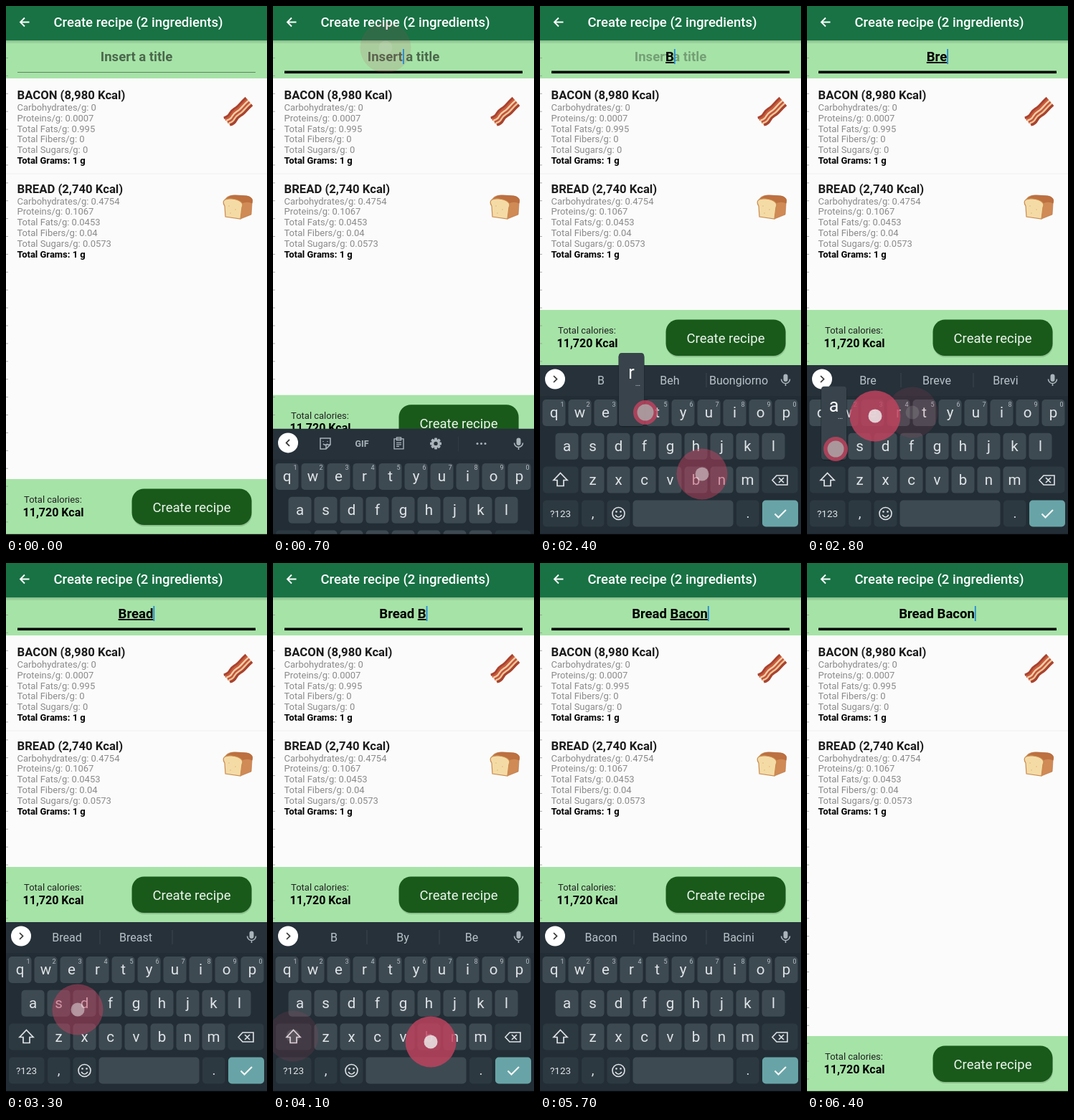
These frames come from a looping animation (364x738 px, 6500 ms). An HTML page:

```html
<!DOCTYPE html>
<html lang="en">
<head>
<meta charset="utf-8">
<style>
html, body { margin: 0; width: 100%; height: 100%; overflow: hidden; background: #fbfbfb; }
svg { display: block; width: 100vw; height: 100vh; font-family: Roboto, sans-serif; }
text { white-space: pre; }
</style>
</head>
<body>
<svg id="stage" viewBox="0 0 364 738"></svg>
<script>
const LOOP = 6500, STEP = 100;
const GREEN = '#a6e3a7', KEY = '#3e4a52', DARK_KEY = '#2d3941', BOARD = '#222d35', INK = '#dfe4e7', PINK = '#c2425e';
const stage = document.getElementById('stage');

const rect = (x, y, w, h, fill, r = 0, extra = '') =>
  `<rect x="${x}" y="${y}" width="${w}" height="${h}" rx="${r}" fill="${fill}" ${extra}/>`;
const text = (x, y, size, fill, str, extra = '') =>
  `<text x="${x}" y="${y}" font-size="${size}" fill="${fill}" ${extra}>${str}</text>`;
const line = (d, color, width = 1.6, fill = 'none') =>
  `<path d="${d}" fill="${fill}" stroke="${color}" stroke-width="${width}"/>`;
const circle = (x, y, r, fill, opacity = 1) =>
  `<circle cx="${x}" cy="${y}" r="${r}" fill="${fill}" opacity="${opacity}"/>`;
const group = (y, content) => `<g transform="translate(0 ${y})">${content}</g>`;
const MID = 'text-anchor="middle"', BOLD = 'font-weight="700"';

const clamp = v => Math.max(0, Math.min(1, v));
const easeOut = (t, from, to) => 1 - (1 - clamp((t - from) / (to - from))) ** 2;

// time, key, finger x, finger y
const touches = [
  [300, 'title', 157, 58], [1700, 'shift', 28, 660], [2100, 'B', 226, 653],
  [2400, 'r', 147, 567], [2600, 'e', 95, 572], [2800, 'a', 40, 618], [3000, 'd', 100, 623],
  [3400, ' ', 190, 708], [3700, 'shift', 28, 660], [3900, 'B', 220, 668], [4200, 'a', 42, 617],
  [4400, 'c', 143, 664], [4600, 'o', 303, 572], [4900, 'n', 252, 665], [5800, 'done', 335, 708]
];
const typed = touches.filter(([, key]) => key.length === 1);
const suggestions = {
  'B': ['B', 'Beh', 'Buongiorno'], 'Br': ['Br', 'Bravo', 'Brava'], 'Bre': ['Bre', 'Breve', 'Brevi'],
  'Brea': ['Brea', 'Bread', 'Break'], 'Bread': ['Bread', 'Breast', ''], 'Bread ': ['e', 'di', 'in'],
  'Bread B': ['B', 'By', 'Be'], 'Bread Ba': ['Ba', 'Bar', 'Basta'], 'Bread Bac': ['Bac', 'Bacio', 'Baci'],
  'Bread Baco': ['Baco', 'Bacon', 'Bacoli'], 'Bread Bacon': ['Bacon', 'Bacino', 'Bacini']
};

function ingredient(top, name, values) {
  const labels = ['Carbohydrates', 'Proteins', 'Total Fats', 'Total Fibers', 'Total Sugars'];
  return group(top,
    text(15.5, 29.4, 16.69, '#1c1c1c', name, BOLD) +
    labels.map((label, i) => text(15.5, 45 + i * 14.83, 12.98, '#8a8a8a', `${label}/g: ${values[i]}`)).join('') +
    text(15.5, 119.2, 12.98, '#000', 'Total Grams: 1 g', BOLD));
}

function bacon() {
  const strips = [[-6.5, '#a8432f'], [-3.5, '#c9593c'], [-1, '#f3cfa4'], [1.5, '#c4553d'], [4, '#f0c698'], [6.5, '#a8432f']];
  return strips.map(([offset, color]) => `<g transform="translate(${offset * .65} ${offset * .75})">` +
    line('M308 161c5-1 7-3 9-7s5-5 9-8 5-6 13-13', color, 3.4) + '</g>').join('');
}

const bread = () =>
  line('M304 274Q306 264 318 264L336 265Q346 267 343 276L342 291L327 297Z', '#b66b3b', .6, '#d08a55') +
  line('M308 269Q312 264 320 264L336 265Q346 267 343 275Q335 271 328 276Q322 268 308 269Z', '#b4683a', .5, '#bd7040') +
  line('M305 279C300 271 306 268 315 269S333 274 329 281L327 297L306 294Z', '#c98a4e', 1.2, '#f4dba6') +
  [[311, 279], [320, 284], [313, 289]].map(([x, y]) => circle(x, y, .8, '#dcb578')).join('');

const page = rect(0, 0, 364, 738, '#fbfbfb') +
  ingredient(101, 'BACON (8,980 Kcal)', [0, '0.0007', '0.995', 0, 0]) + bacon() +
  rect(0, 233.5, 364, 1, '#f0f0f0') +
  ingredient(231.5, 'BREAD (2,740 Kcal)', ['0.4754', '0.1067', '0.0453', '0.04', '0.0573']) + bread();

const footer = rect(0, 0, 364, 78, GREEN) +
  text(65.5, 33, 12.98, '#222', 'Total calories:', MID) +
  text(66, 51.5, 16, '#000', '11,720 Kcal', MID + BOLD) +
  rect(176, 15, 167, 51, '#000', 17, 'opacity=".15"') +
  rect(175.5, 13.5, 167, 50.5, '#195a1b', 17) +
  text(259, 46, 18.54, '#eef5ee', 'Create recipe', MID);

const header = rect(0, 48, 364, 2, '#000', 0, 'opacity=".14"') + rect(0, 50, 364, 2, '#000', 0, 'opacity=".07"') +
  rect(0, 0, 364, 48, '#187244') +
  line('M32.5 22.5H20M26 16.5L20 22.5L26 28.5', '#fff', 1.9) +
  text(66.5, 29, 18.54, '#fff', 'Create recipe (2 ingredients)', 'font-weight="500"');

const ticks = Array.from({ length: 27 }, (_, i) => rect(0, 72 + i * 24.9, 3, 1, '#8a958a', 0, 'opacity=".7"')).join('');

// Keyboard
const rows = ['qwertyuiop', 'asdfghjkl', 'zxcvbnm'];
const keyCenter = letter => {
  const row = rows.findIndex(r => r.includes(letter));
  return [19.5 + row * 18 + (row === 2 ? 18 : 0) + rows[row].indexOf(letter) * 36, 567.5 + row * 46.8];
};

function letterKey(letter, upper) {
  const [x, y] = keyCenter(letter), digit = rows[0].indexOf(letter) + 1;
  return rect(x - 16, y - 18.5, 32, 37, KEY, 5) +
    text(x, y + 6.5, 20.5, INK, upper ? letter.toUpperCase() : letter, MID) +
    (digit ? text(x + 11.5, 558.5, 9, '#b3bcc2', digit % 10, MID) : '');
}

const specialKeys =
  rect(4, 642.5, 49.5, 37, DARK_KEY, 5) + rect(309.5, 642.5, 50, 37, DARK_KEY, 5) +
  line('M330 655H345V668H330L324 661.5ZM333 658L340 665M340 658L333 665', INK) +
  rect(4, 689.5, 49.5, 37, DARK_KEY, 5) + text(28.5, 713, 13.5, INK, '?123', MID) +
  rect(58, 689.5, 31.5, 37, DARK_KEY, 5) + text(73.5, 714, 19, INK, ',', MID) +
  rect(93.5, 689.5, 32, 37, DARK_KEY, 5) +
  line('M118 708A8.5 8.5 0 1 1 101 708A8.5 8.5 0 1 1 118 708M105 710Q109.5 716 114 710', INK) +
  circle(106.5, 705.5, 1.3, INK) + circle(112.5, 705.5, 1.3, INK) +
  rect(129.5, 689.5, 140, 37, KEY, 5) +
  rect(274, 689.5, 31.5, 37, DARK_KEY, 5) + text(290, 714, 19, INK, '.', MID) +
  rect(310, 689.5, 50, 37, '#68a4a7', 5) + line('M327.5 708.5L332.5 713.5L343 703', '#fff', 2);

const mic = rect(339.5, 513.5, 6, 10.5, '#aab4ba', 3) + line('M336.5 520.5A6 6 0 0 0 348.5 520.5M342.5 526.5V530', '#aab4ba');
const cog = Array.from({ length: 8 }, (_, i) => rect(225, 513.5, 4, 4, '#aab4ba', 1, `transform="rotate(${i * 45} 227 521.5)"`)).join('') +
  `<circle cx="227" cy="521.5" r="4.3" fill="none" stroke="#aab4ba" stroke-width="3.2"/>`;
const toolbar = line('M66 514H80V523L74 529H66ZM80 523H74V529M70 522Q73 525 76 522M70 518V519M76 518V519', '#aab4ba', 1.5) +
  text(124, 526, 12.5, '#aab4ba', 'GIF', MID + BOLD) +
  line('M169 515H182V529H169ZM172.5 515V513H178.5V517H172.5ZM172 520.5H179M172 523H179M172 525.5H176', '#aab4ba', 1.4) +
  cog + rect(258, 512, 1, 20, '#303b43') +
  [285, 290.5, 296].map(x => circle(x, 521.5, 1.5, '#aab4ba')).join('');

function keyboard(value, upper) {
  const words = suggestions[value];
  const bar = words
    ? words.map((word, i) => text(85 + i * 96, 527.5, 16, '#b9c2c8', word, MID)).join('') +
      rect(130.5, 512, 1, 20, '#3b464e') + rect(231.5, 512, 1, 20, '#3b464e')
    : toolbar;
  return rect(0, 501, 364, 240, BOARD) + rect(0, 501, 364, 43, '#26313a') +
    circle(21, 520.5, 14, '#fff') +
    line(words ? 'M19 516L23.5 520.5L19 525' : 'M23 516L18.5 520.5L23 525', '#333', 1.7) +
    bar + mic + specialKeys +
    line('M28.5 651.5L38 661.5H33V669.5H24V661.5H19Z', INK, 1.7, upper ? INK : 'none') +
    [...rows.join('')].map(letter => letterKey(letter, upper)).join('');
}

function popup(letter) {
  const [x, y] = keyCenter(letter.toLowerCase());
  return rect(x - 18, y - 83, 36, 103, '#1a2329', 5) + rect(x - 17.5, y - 83.5, 35, 102, '#38434b', 4) +
    text(x, y - 48, 25, '#fff', letter, MID) + text(x + 9, y - 38, 11, '#d0d6d9', '…', MID);
}

function ripple(age, x, y) {
  const opacity = .82 * (1 - clamp((age - 200) / 240));
  const radius = [17, 32][age / STEP] || 35.5;
  return circle(x, y, radius, PINK, opacity) +
    circle(x, y, age ? 9.5 : 11.5, age ? '#eee' : '#aaa', opacity);
}

function titleField(t, value, focused) {
  const hint = value ? .54 * clamp(1 - (t - 2300) / 220) : .54;
  const split = t < 5900 ? value.lastIndexOf(' ') + 1 : value.length;
  const content = value.slice(0, split) + `<tspan text-decoration="underline">${value.slice(split)}</tspan>`;
  return rect(0, 48, 364, 53, GREEN) +
    (hint ? text(182, 77, 18.54, '#000', 'Insert a title', `${MID} ${BOLD} opacity="${hint}"`) : '') +
    text(181, 77, 18.54, '#000', content, `${MID} ${BOLD} id="value"`) +
    (focused ? rect(16, 90.5, 332, 3.6, '#000') : rect(16, 92, 332, 1, '#5f8560'));
}

function draw(t) {
  const entered = typed.filter(([time]) => t >= time + 200);
  const value = entered.map(([, key]) => key).join('');
  const focused = t >= 400;
  const upper = (t >= 1800 && t < 2300) || (t >= 3800 && t < 4100);
  const closing = easeOut(t, 5900, 6250);
  const boardY = 237 * (1 - easeOut(t, 600, 858) + closing);
  const footerY = 424 + 236 * (1 - easeOut(t, 600, 944) + closing);
  const active = touches.filter(([time]) => t >= time && t < time + 500);
  const pressed = active.filter(([time, key]) => /^\w$/.test(key) && t <= time + 100);

  stage.innerHTML = page + titleField(t, value, focused) + header + group(footerY, footer) + ticks +
    (boardY < 237 ? group(boardY, keyboard(value, upper)) : '') +
    pressed.map(([, key]) => popup(key)).join('') +
    active.map(([time, , x, y]) => ripple(t - time, x, y)).join('') +
    rect(0, 736.8, 364, 1.2, '#000');

  const lastEdit = entered.length ? entered[entered.length - 1][0] + 200 : 400;
  if (focused && (t - lastEdit) % 1100 < 700) {
    const x = 181 + document.getElementById('value').getComputedTextLength() / 2;
    stage.insertAdjacentHTML('beforeend', rect(x, 60, 1.8, 21, '#2389d8'));
  }
}

let shown = -1;
function frame(now) {
  const t = Math.floor(now % LOOP / STEP) * STEP;
  if (t !== shown) draw(shown = t);
  requestAnimationFrame(frame);
}
draw(0);
requestAnimationFrame(frame);
</script>
</body>
</html>
```
